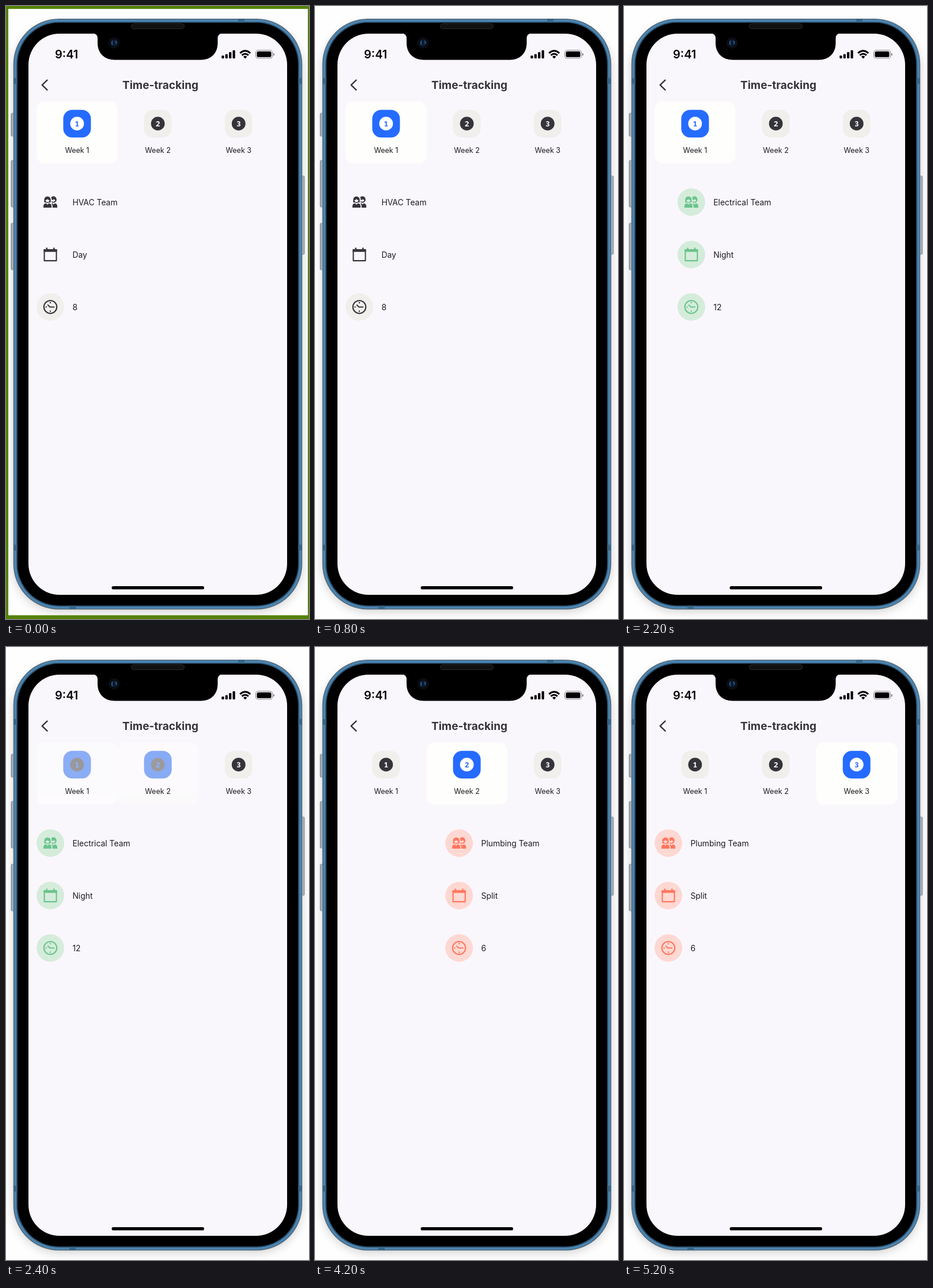
These frames come from a looping animation (526 by 1064 pixels, 7.8 s). An HTML page:

```html
<!DOCTYPE html>
<html lang="en">
<head>
<meta charset="utf-8">
<title>Time-tracking</title>
<style>
  html, body { margin: 0; width: 100%; height: 100%; overflow: hidden; background: #fefefe; }
  svg { display: block; width: 100%; height: 100%; }
  text { font-family: Inter, "Open Sans", sans-serif; font-weight: 430; fill: #1c1b20; }
  .badge { font: 700 13px "Noto Sans Mono", monospace; text-anchor: middle; }
</style>
</head>
<body>
<svg viewBox="0 0 526 1064">
  <defs>
    <clipPath id="screenClip"><rect x="39" y="48" width="449" height="974" rx="54"/></clipPath>
    <filter id="blur" x="-20%" y="-20%" width="140%" height="140%"><feGaussianBlur stdDeviation="9"/></filter>
    <linearGradient id="metal">
      <stop offset="0" stop-color="#7d8894"/><stop offset=".5" stop-color="#b9c2ca"/><stop offset="1" stop-color="#8b98a6"/>
    </linearGradient>
  </defs>
  <rect width="526" height="1064" fill="#fefefe"/>
  <rect x="14" y="32" width="499" height="1018" rx="78" fill="#000" opacity=".2" filter="url(#blur)"/>

  <g id="buttons" fill="url(#metal)" stroke="#7a8591" stroke-width=".8"></g>
  <g id="shell"></g>
  <g id="bands" fill="#34607f" opacity=".8"></g>
  <rect x="20" y="29" width="487" height="1011.5" rx="72"/>
  <rect x="39" y="48" width="449" height="974" rx="54" fill="#faf7fc"/>

  <g id="weeks"></g>
  <g clip-path="url(#screenClip)"><g id="panels"></g></g>

  <path d="M151 47Q159 48.5 159 56V64C159 82 171 93.5 189 93.5H338C356 93.5 367.5 82 367.5 64V56Q367.5 48.5 375.5 47Z"/>
  <rect x="217.5" y="30.5" width="92" height="9" rx="4.5" fill="#111" stroke="#2a2a2c"/>
  <circle cx="187.7" cy="64" r="10" fill="#0b0d13"/>
  <circle cx="187.7" cy="64" r="6" fill="#0d1a2c"/>
  <path d="M185 60.5Q182.5 64 185 67.5M190 60.5Q193 63 190.5 66" fill="none" stroke="#2c5b94" stroke-width="1.8"/>

  <text x="85" y="91" font-size="20" style="fill:#000;font-weight:600">9:41</text>
  <g id="signal"></g>
  <g fill="none" stroke="#000" stroke-width="3">
    <path d="M406.2 81.8Q415.2 73.8 424.2 81.8"/>
    <path d="M409.5 85.5Q415.2 80.5 420.9 85.5"/>
  </g>
  <path d="M412 88Q415.2 85.2 418.4 88L415.2 91.2Z"/>
  <rect x="433.5" y="76.8" width="29" height="14" rx="4.3" fill="none" stroke="#000" stroke-opacity=".45" stroke-width="1.1"/>
  <rect x="435.5" y="78.8" width="25" height="10" rx="2.6"/>
  <path d="M464 81.5Q466 82 466 84T464 86.5Z" opacity=".5"/>

  <path d="M71.5 128.7L62.7 137.2L71.5 145.7" fill="none" stroke="#35343a" stroke-width="2.4" stroke-linecap="round" stroke-linejoin="round"/>
  <text x="268" y="143.8" font-size="19" text-anchor="middle" style="fill:#35343a;font-weight:700">Time-tracking</text>
  <rect x="183.5" y="1007" width="160.5" height="5.6" rx="2.8"/>

  <path id="edge" fill="#548203" fill-rule="evenodd" d="M0 0H526V1064H0ZM4 5V1057.5H524V5Z"/>
</svg>
<script>
const LOOP = 7800, STEP = 200, PAGE = 449;
const INK = '#35343a', BLUE = '#256bff';
const $ = id => document.getElementById(id);
const rect = (x, y, w, h, r, more = '') =>
  `<rect x="${x}" y="${y}" width="${w}" height="${h}" rx="${r}" ${more}/>`;

$('buttons').innerHTML =
  [[9, 186, 40], [9, 268, 81], [9, 377, 81], [512, 295, 136]]
    .map(([x, y, h]) => rect(x, y, 6, h, 1.5)).join('');

// Nested layers of the metal rim, from the outside in.
$('shell').innerHTML =
  [[0, '#56697a'], [1.6, '#4a84b0'], [5.4, '#2a4d69']]
    .map(([d, fill]) => rect(12.7 + d, 22 + d, 501.6 - 2 * d, 1025.6 - 2 * d, 79 - d, `fill="${fill}"`)).join('');

$('bands').innerHTML =
  [[13, 125, 7, 10], [507, 125, 7, 10], [13, 935, 7, 10], [507, 935, 7, 10], [403, 22, 11, 7], [110, 1040, 11, 7]]
    .map(([x, y, w, h]) => rect(x, y, w, h, 0)).join('');
$('signal').innerHTML =
  [5, 7.5, 11, 14.3].map((h, i) => rect(374.3 + 6.4 * i, 91 - h, 4.2, h, 1.2)).join('');

function week(i) {
  const x = 123.4 + 140.2 * i;
  const tile = (fill, badge, ink) =>
    rect(x - 24, 180.3, 48, 48, 15.5, `fill="${fill}"`) +
    `<circle cx="${x}" cy="204.2" r="11.9" fill="${badge}"/>
     <text class="badge" x="${x}" y="208.9" style="fill:${ink}">${i + 1}</text>`;
  return tile('#f0efec', INK, '#fff') +
    `<g class="active">${rect(x - 70.2, 165.5, 140.4, 108, 14, 'fill="#fefefc"')}${tile(BLUE, '#fff', BLUE)}</g>
     <text x="${x}" y="255.2" font-size="12.6" text-anchor="middle">Week ${i + 1}</text>`;
}
$('weeks').innerHTML = [0, 1, 2].map(week).join('');

// Icons are drawn around their own centre.
const icons = {
  team: c => `<g fill="${c}" fill-rule="evenodd">
    <path d="M-10.6 .6V-4.4A5.6 5.6 0 0 1 .6 -4.4V.6H-2.4A4 4 0 0 1 -7.6 .6ZM-8.4 -3.4A3.4 3.4 0 0 0 -1.6 -3.4Q-4 -3.4 -5 -5.4Q-6 -3.4 -8.4 -3.4Z"/>
    <path d="M1.4 -8.6A5.6 5.6 0 1 1 2.2 .2V-2A3.6 3.6 0 0 0 8.6 -3.6Q6.8 -3.8 6 -5.2Q4.8 -3.6 2.4 -3.6Q2.6 -6.6 1.4 -8.6Z"/>
    <path d="M-12 9.6V7.2Q-12 2.4 -7.4 2.2L-5 4.4L-2.6 2.2Q2 2.4 2 7.2V9.6Z"/>
    <path d="M1.8 2.4H3.8L5.6 4.2L7.6 2.2Q12 2.6 12 7.2V9.6H3.8V7.2Q3.8 4.2 1.8 2.4Z"/></g>`,
  shift: c => `<path d="M-10.5 -8H10.5V10.7H-10.5Z" fill="none" stroke="${c}" stroke-width="2.1" stroke-linejoin="round"/>
    <path d="M-11.5 -9.2H-7.5V-12H-5V-9.2H5V-12H7.5V-9.2H11.5V-4.6H-11.5Z" fill="${c}"/>`,
  hours: c => `<circle r="11.2" fill="none" stroke="${c}" stroke-width="2.1"/>
    <path d="M-4.8 -3.8L-.6 0H7" fill="none" stroke="${c}" stroke-width="2" stroke-linejoin="round"/>
    <g fill="${c}"><circle cy="-7.4" r="1.2"/><circle cy="7.4" r="1.2"/><circle cx="-7.4" r="1.2"/></g>`
};

const panels = [
  { ink: INK, discs: ['none', 'none', '#f0efec'], labels: ['HVAC Team', 'Day', '8'] },
  { ink: '#6ac48d', discs: Array(3).fill('#d5ecdb'), labels: ['Electrical Team', 'Night', '12'] },
  { ink: '#ff775e', discs: Array(3).fill('#fed8d2'), labels: ['Plumbing Team', 'Split', '6'] }
];
$('panels').innerHTML = panels.map(({ ink, discs, labels }) =>
  '<g>' + Object.values(icons).map((icon, row) =>
    `<g transform="translate(77 ${340.4 + 91 * row})">
      <circle r="24" fill="${discs[row]}"/>${icon(ink)}
      <text x="38.4" y="5.2" font-size="13.9">${labels[row]}</text></g>`).join('') + '</g>').join('');

const panelNodes = [...$('panels').children];
const activeNodes = [...document.querySelectorAll('.active')];

function ease(t, start, duration) {
  const x = Math.min(1, Math.max(0, (t - start) / duration));
  return (1 - Math.cos(Math.PI * x)) / 2;
}

function draw(ms) {
  // The picture advances in 200 ms steps.
  const t = Math.floor(ms % LOOP / STEP) * STEP;
  const page = ease(t, 1848, 436) + ease(t, 3950, 436);
  const selected = ease(t, 2284, 230) + ease(t, 4386, 230);
  panelNodes.forEach((node, i) =>
    node.setAttribute('transform', `translate(${((i - page) * PAGE).toFixed(2)} 0)`));
  activeNodes.forEach((node, i) =>
    node.setAttribute('opacity', Math.max(0, 1 - Math.abs(i - selected)).toFixed(3)));
  $('edge').setAttribute('visibility', t < 200 ? 'visible' : 'hidden');
}

const begin = performance.now();
function tick() {
  draw(performance.now() - begin);
  requestAnimationFrame(tick);
}
tick();
</script>
</body>
</html>
```
